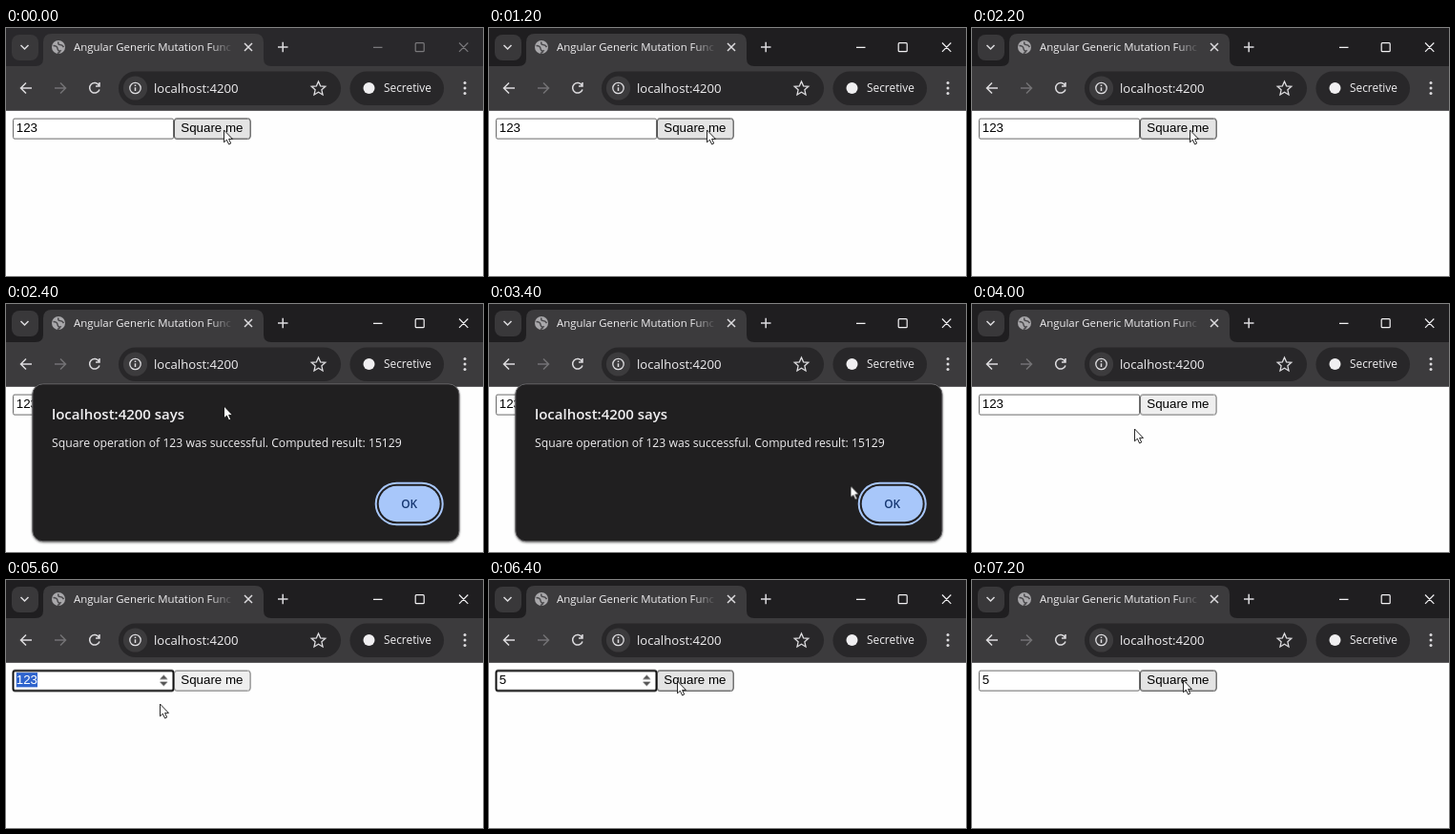
Animation of 500x260 px, one loop 8 s. Source, as an HTML page:

```html
<!DOCTYPE html>
<html lang="en">
<head>
<meta charset="utf-8">
<title>Square me</title>
<style>
  html, body { margin: 0; width: 100%; height: 100%; overflow: hidden; background: #fefefe; }
  svg { display: block; width: 100vw; height: 100vh; }
  .ui { font-family: "Open Sans", "Noto Sans", sans-serif; fill: #f0eff1; }
  .form { font: 13.33px "Liberation Sans", Arial, sans-serif; fill: #000; }
  .line { fill: none; stroke: #dddcdf; stroke-width: 1.5; }

  .strip, .controls, .hover, .dialog, .ring, .old, .picked, .focus, .typed, .cursor {
    animation: 8s step-end infinite;
  }
  .strip { animation-name: strip; }
  .controls { animation-name: controls; }
  .hover { animation-name: hover; }
  .dialog { animation-name: dialog; }
  .ring { animation-name: ring; }
  .old { animation-name: old; }
  .picked { animation-name: picked; }
  .focus { animation-name: focus; }
  .typed { animation-name: typed; }
  .cursor { animation-name: move, blink; }

  /* the window gains focus */
  @keyframes strip { 0% { fill: #29282b; } 5%, 100% { fill: #1f1e20; } }
  @keyframes controls { 0% { stroke: #79787b; } 5%, 100% { stroke: #f2f1f3; } }

  @keyframes hover { 0% { opacity: 1; } 47.5% { opacity: 0; } 80%, 100% { opacity: 1; } }

  /* opens at rest, lifts slightly while closing */
  @keyframes dialog {
    0% { opacity: 0; transform: none; }
    30% { opacity: 1; transform: none; }
    47.5% { opacity: 1; transform: translateY(-3.3px); }
    50%, 100% { opacity: 0; transform: none; }
  }
  @keyframes ring { 0% { opacity: 1; } 47.5%, 100% { opacity: 0; } }

  @keyframes old { 0% { opacity: 1; } 72.5%, 100% { opacity: 0; } }
  @keyframes picked { 0% { opacity: 0; } 65% { opacity: 1; } 72.5%, 100% { opacity: 0; } }
  @keyframes focus { 0% { opacity: 0; } 65% { opacity: 1; } 87.5%, 100% { opacity: 0; } }
  @keyframes typed { 0% { opacity: 0; } 72.5%, 100% { opacity: 1; } }

  @keyframes move {
    0% { transform: translate(228px, 107px); }
    30% { transform: translate(228px, 107px); animation-timing-function: steps(6); }
    45% { transform: translate(408.5px, 207px); }
    50% { transform: translate(170px, 131px); }
    60% { transform: translate(170px, 131px); animation-timing-function: steps(3); }
    67.5% { transform: translate(161px, 130px); }
    80% { transform: translate(197px, 106px); animation-timing-function: steps(3); }
    87.5%, 100% { transform: translate(221px, 105px); }
  }
  /* hidden while typing */
  @keyframes blink { 0% { opacity: 1; } 72.5% { opacity: 0; } 80%, 100% { opacity: 1; } }
</style>
</head>
<body>
<svg viewBox="0 0 500 260" preserveAspectRatio="none">
  <defs>
    <linearGradient id="fade" gradientUnits="userSpaceOnUse" x1="214" x2="238" y1="0" y2="0">
      <stop stop-color="#f0eff1"/>
      <stop offset="1" stop-color="#3c3b3d"/>
    </linearGradient>
    <filter id="shadow" x="-5%" y="-10%" width="110%" height="120%" color-interpolation-filters="sRGB">
      <feDropShadow dx="0" dy="1" stdDeviation="1.2" flood-color="#000" flood-opacity=".5"/>
    </filter>
  </defs>

  <rect width="500" height="260" fill="#fefefe"/>

  <!-- tab strip -->
  <rect class="strip" width="500" height="42"/>
  <rect x="6" y="7" width="28" height="27" rx="8" fill="#39383a"/>
  <path class="line" d="M15.500 18l4 4 4-4"/>
  <path d="M31 40q8 0 8-8V15q0-9 9-9H261q9 0 9 9V32q0 8 8 8z" fill="#3c3b3d"/>
  <circle cx="55" cy="20" r="7" fill="#a9a8ab"/>
  <path d="M49.500 18.500q4 0 4.500 3t3 2.500q-1 2-3 2.500M55 14.500q-1 3 1.500 3t4 2.500" fill="none" stroke="#4a494c" stroke-width="1.500"/>
  <text class="ui" x="71" y="24.200" font-size="11.4" style="fill:url(#fade)">Angular Generic Mutation Func</text>
  <path class="line" d="M250 16l8 8M258 16l-8 8"/>
  <path class="line" d="M285 20h10.500M290.200 14.700v10.500"/>
  <path class="controls" d="M385 20.300h9.500M430.200 15.700h7q1 0 1 1v7q0 1-1 1h-7q-1 0-1-1v-7q0-1 1-1zM475 15.500l9.300 9.300M484.300 15.500l-9.300 9.300" fill="none" stroke-width="1.200"/>

  <!-- toolbar -->
  <rect y="40" width="500" height="46.800" fill="#3c3b3d"/>
  <path class="line" d="M27 63H16M21 57.500L15.500 63l5.500 5.500"/>
  <path class="line" d="M51 63h11M57 57.500l5.500 5.500-5.500 5.500" style="stroke:#737275"/>
  <path class="line" d="M97.500 60A5.300 5.300 0 1 0 98 64.500M98 57v4h-4"/>
  <rect x="118" y="45.500" width="233" height="35.500" rx="17.700" fill="#282729"/>
  <circle cx="135.500" cy="63" r="12.600" fill="#3c3b3d"/>
  <circle class="line" cx="135.500" cy="63" r="5.700" style="stroke-width:1.300"/>
  <path class="line" d="M135.500 62.300v3.700M135.500 59.600v1.400"/>
  <text class="ui" x="155" y="68" font-size="13.15">localhost:4200</text>
  <path class="line" d="M327.500 56l2.100 4.800 5.200.5-3.900 3.500 1.100 5.200-4.500-2.700-4.500 2.700 1.100-5.200-3.900-3.500 5.200-.5z" style="stroke-width:1.300"/>
  <rect x="360.500" y="45.500" width="98.500" height="35.500" rx="17.700" fill="#282729"/>
  <circle cx="380.500" cy="63" r="6" fill="#f0eff1"/>
  <text class="ui" x="396" y="67" font-size="11.9">Secretive</text>
  <g fill="#dddcdf">
    <circle cx="481" cy="57.500" r="1.500"/>
    <circle cx="481" cy="63" r="1.500"/>
    <circle cx="481" cy="68.500" r="1.500"/>
  </g>

  <!-- page -->
  <g class="form" transform="translate(0 -.4)">
    <rect x="7.500" y="95.500" width="168" height="21" rx="1.500" fill="#fff" stroke="#6a6a6a"/>
    <text class="old" x="10.800" y="109.300">123</text>
    <g class="picked">
      <rect x="10.800" y="97.500" width="22.200" height="15.500" fill="#2f64cd"/>
      <text x="10.800" y="109.300" fill="#fff">123</text>
    </g>
    <text class="typed" x="10.800" y="109.300">5</text>
    <g class="focus">
      <rect x="7.500" y="95.500" width="168" height="21" rx="2" fill="none" stroke="#101010" stroke-width="2"/>
      <path d="M161 104.500l4.300-4.500 4.300 4.500zM161 107l4.300 4.500 4.300-4.500z" fill="#555"/>
    </g>
    <rect x="176.500" y="95.500" width="79.600" height="21" rx="2.500" fill="#efefef" stroke="#6a6a6a"/>
    <rect class="hover" x="176.500" y="95.500" width="79.600" height="21" rx="2.500" fill="#e4e4e4" stroke="#505050"/>
    <text x="183.300" y="109.300">Square me</text>
  </g>

  <!-- alert -->
  <g class="dialog">
    <rect x="27.800" y="83.800" width="447.200" height="165" rx="11" fill="#201f20" stroke="#68676a" filter="url(#shadow)"/>
    <text class="ui" x="48" y="121" font-size="15" font-weight="600">localhost:4200 says</text>
    <text class="ui" x="48" y="150" font-size="12.2">Square operation of 123 was successful. Computed result: 15129</text>
    <rect class="ring" x="387.700" y="187.700" width="70" height="43.600" rx="21.800" fill="none" stroke="#a8c7fa" stroke-width="2"/>
    <rect x="390.700" y="190.700" width="64" height="37.600" rx="18.800" fill="#a8c7fa"/>
    <text class="ui" x="422.700" y="214.200" font-size="11.9" font-weight="600" text-anchor="middle" style="fill:#173872">OK</text>
  </g>

  <path class="cursor" d="M.5 0V12.800L3.400 10.200 5.600 15 7.700 14 5.600 9.400H9.500z" fill="#fff" stroke="#111" stroke-width=".9"/>
</svg>
</body>
</html>
```
